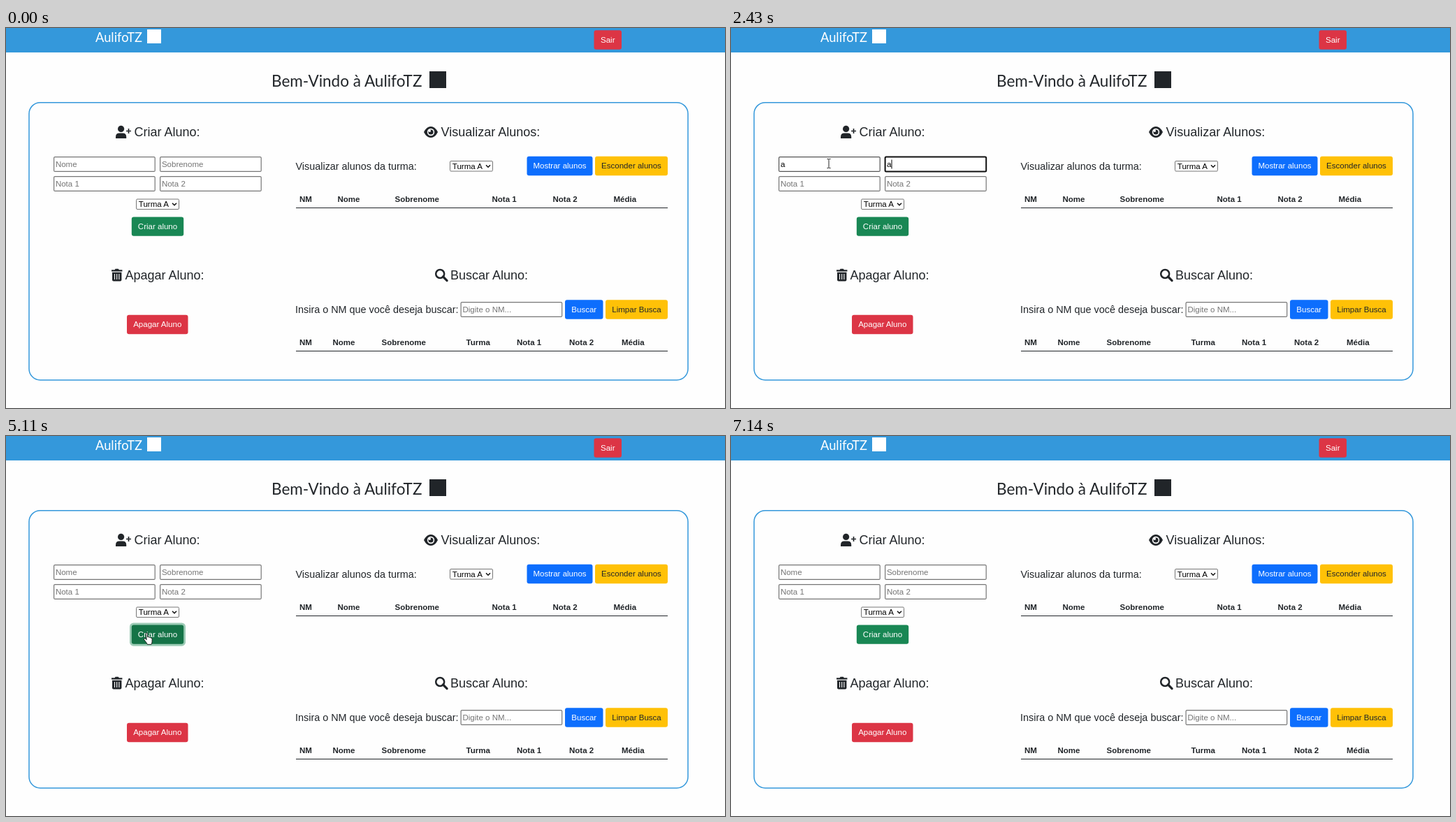
An HTML page that plays this animation: 1029x544 px, repeating every 7.21 s.

```html
<!DOCTYPE html>
<html lang="pt">
<head>
<meta charset="utf-8">
<title>AulifoTZ</title>
<style>
html, body { margin: 0; width: 100%; height: 100%; overflow: hidden; background: #fefefe; }
svg { display: block; width: 100%; height: 100%; }
text { font: 11.52px "Liberation Sans", Arial, sans-serif; fill: #212529; white-space: pre; }
.brand { font: 18.3px Lato, sans-serif; fill: #fff; }
.title { font: 22.5px Lato, sans-serif; }
.head { font-size: 18px; }
.label { font-size: 14.4px; }
.th { font-weight: bold; }
.mid { text-anchor: middle; }
.alert { font: 8.8px "Open Sans", sans-serif; fill: #fff; }
.ok { font: 8px "Open Sans", sans-serif; fill: #202124; }
.icon { fill: #212529; }
</style>
</head>
<body>
<svg id="stage" viewBox="0 0 1029 544">
  <defs>
    <filter id="shadow" x="-10%" y="-20%" width="120%" height="160%">
      <feDropShadow dx="0" dy="2" stdDeviation="2.5" flood-opacity=".4"/>
    </filter>
  </defs>
  <rect width="1029" height="35" fill="#3498db"/>
  <text class="brand" x="128" y="20">AulifoTZ</text>
  <rect x="202" y="2" width="20" height="20" fill="#fff"/>
  <text class="title" x="380" y="83.5">Bem-Vindo à AulifoTZ</text>
  <rect x="606" y="62" width="24" height="24" fill="#212529"/>
  <rect x="33" y="106.7" width="943" height="397.3" rx="16" fill="none" stroke="#3498db" stroke-width="1.5"/>

  <g class="icon">
    <circle cx="164.6" cy="144.4" r="4.6"/>
    <path d="M157 158v-2.200q0-5.300 5.300-5.300h4.600q5.300 0 5.300 5.300v2.200z"/>
    <path d="M175.500 144v7M172 147.500h7" stroke="#212529" stroke-width="1.700"/>
    <path d="M598 149Q602 141 608 141T618 149Q614 157 608 157T598 149z"/>
    <circle cx="608" cy="149" r="5.200" fill="#fefefe"/>
    <circle cx="608" cy="149" r="3.600"/>
    <circle cx="606.300" cy="147.300" r="1.700" fill="#fefefe"/>
    <path d="M151 346.300h4.600l1-1.500h4.200l1 1.500h4.600v2.300h-15.400zM152 349.800h13.400v10.800q0 2-2 2h-9.400q-2 0-2-2z"/>
    <path d="M155.500 352v8M158.700 352v8M161.900 352v8" stroke="#fefefe" stroke-width="1.100"/>
    <path d="M625.500 356l5.600 5.600" stroke="#212529" stroke-width="3.200" stroke-linecap="round"/>
    <circle cx="621.200" cy="352" r="6" fill="none" stroke="#212529" stroke-width="2.500"/>
  </g>
  <path d="M415 257.500H947M415 462.500H947" stroke="#212529"/>
  <g id="page"></g>

  <g id="dialog">
    <path d="M344 -10H665V64q0 3-3 3H347q-3 0-3-3z" fill="#292a2d" filter="url(#shadow)"/>
    <text class="alert" x="355.500" y="17">Aluno Criado com sucesso!</text>
    <rect x="607" y="32" width="46.500" height="23" rx="3" fill="none" stroke="#8ab4f8" stroke-width="1.400"/>
    <rect x="609" y="34" width="42.500" height="19" rx="1.500" fill="#8ab4f8"/>
    <text class="ok mid" x="630" y="46.500">OK</text>
  </g>

  <g id="cursor">
    <path id="arrow" d="M0 0V11.500L2.700 9.100L4.500 13.300L6.400 12.500L4.600 8.400H8.200z" fill="#fff" stroke="#111" stroke-width=".8"/>
    <path id="beam" d="M-2.500 -6.500H-.7L0 -5.800L.7 -6.500H2.500M0 -5.800V5.800M-2.500 6.500H-.7L0 5.800L.7 6.500H2.500" fill="none" stroke="#222"/>
    <path id="hand" d="M-1.300 1.200q0-1.300 1.200-1.300t1.200 1.300v4.600q2-.8 2.300.6q1.800-.7 2.200.7q2-.4 2 1.500v3.600q0 1.800-1.100 4.200h-5.700q-.6-2-2.400-3.900l-2.300-3q-.4-1.600 1-1.700q.9 0 2.600 1.900z" fill="#fff" stroke="#111" stroke-width=".9"/>
  </g>
</svg>
<script>
const LOOP = 7210, SEND = 5110, BLINK = 530, STEP = 70;
const $ = id => document.getElementById(id);
const page = $('page');

function add(tag, attrs, text = '') {
  const el = document.createElementNS('http://www.w3.org/2000/svg', tag);
  for (const k in attrs) el.setAttribute(k, attrs[k]);
  el.textContent = text;
  return page.appendChild(el);
}
const label = (cls, x, y, text) => add('text', { class: cls, x, y }, text);
const show = (el, on) => el.setAttribute('visibility', on ? 'visible' : 'hidden');

function button(x, y, w, fill, text, color = '#fff') {
  const box = add('rect', { x, y, width: w, height: 27.4, rx: 3, fill });
  add('text', { class: 'mid', x: x + w / 2, y: y + 17.6, style: 'fill:' + color }, text);
  return box;
}

function select(x, y) {
  add('rect', { x, y, width: 61, height: 14.5, rx: 1.5, fill: '#fff', stroke: '#767676' });
  label('', x + 3.3, y + 11.4, 'Turma A').style.fill = '#000';
  add('path', { d: `M${x + 51.5} ${y + 5.8}l3 3l3-3`, fill: 'none', stroke: '#111', 'stroke-width': 1.5 });
}

function input(x, y, hint, opts = {}) {
  const box = add('rect', { x: x + .6, y: y + .6, width: 144.6, height: 20.8, rx: 1.5, fill: '#fff' });
  const text = label('', x + 2.9, y + 14.5, hint);
  text.style.fill = '#757575';
  const caret = add('rect', { x, y: y + 4.5, width: 1, height: 13, fill: '#000' });
  const spin = add('g', {});
  if (opts.number) {
    const back = add('rect', { x: x + 132.5, y: y + 3.5, width: 10, height: 15, fill: '#efefef' });
    const tips = add('path', { d: `M${x + 134.7} ${y + 8.7}l2.600-3l2.600 3zM${x + 134.7} ${y + 13.700}l2.600 3l2.600-3z`, fill: '#444' });
    spin.append(back, tips);
  }
  return { x, y, hint, box, text, caret, spin, ...opts };
}

label('head', 183.5, 155, 'Criar Aluno:');
label('head', 622.5, 155, 'Visualizar Alunos:');
label('head', 170.5, 360, 'Apagar Aluno:');
label('head', 636, 360, 'Buscar Aluno:');
label('label', 414.5, 203, 'Visualizar alunos da turma:');
label('label', 414, 408, 'Insira o NM que você deseja buscar:');

function header(y, names, xs) {
  names.forEach((name, i) => label('th', xs[i], y, name));
}
header(248.5, ['NM', 'Nome', 'Sobrenome', 'Nota 1', 'Nota 2', 'Média'], [420, 474.5, 556.5, 695.5, 782.5, 869.5]);
header(453.8, ['NM', 'Nome', 'Sobrenome', 'Turma', 'Nota 1', 'Nota 2', 'Média'], [420, 467.5, 537.5, 658.5, 731, 806, 881]);

button(841.5, 3.3, 39.5, '#dc3545', 'Sair');
button(173, 410.8, 87.5, '#dc3545', 'Apagar Aluno');
button(745.5, 183.8, 94, '#0d6efd', 'Mostrar alunos');
button(843, 183.8, 104, '#ffc107', 'Esconder alunos', '#212529');
button(800, 389.3, 54.5, '#0d6efd', 'Buscar');
button(858, 389.3, 89, '#ffc107', 'Limpar Busca', '#212529');
const glow = add('rect', { x: 177, y: 267.5, width: 80, height: 33.2, rx: 5.5, fill: 'rgba(60,153,110,.5)' });
const create = button(179.8, 270.4, 74.4, '#198754', 'Criar aluno');
select(186.5, 245);
select(635.5, 190.5);

// focus, typing and blur times of each field
const fields = [
  input(68, 184, 'Nome', { value: 'a', focus: 1170, typed: 1770, blur: 1970 }),
  input(220, 184, 'Sobrenome', { value: 'a', focus: 1970, typed: 2430, blur: 2760 }),
  input(68, 212, 'Nota 1', { value: '6', focus: 2760, typed: 3490, blur: 3690, number: true }),
  input(220, 212, 'Nota 2', { value: '7', focus: 3690, typed: 3890, blur: 5040, number: true }),
];
const search = input(650.5, 392, 'Digite o NM...');
search.box.setAttribute('stroke', '#767676');
search.box.setAttribute('stroke-width', 1.2);
show(search.caret, false);

// pointer stops: time, x, y
const route = [
  [130, 810, 495], [830, 150, 215], [1240, 140, 194], [4350, 140, 194],
  [4420, 139, 193.5], [5040, 201.5, 284], [5110, 201.5, 282], [5170, 201.5, 282],
  [5510, 592, 40], [5710, 592, 40], [5920, 600, 30], [6130, 614, 49],
  [6400, 614, 49], [6610, 831, 494], [LOOP, 831, 494],
];

function pointer(t) {
  const i = Math.max(0, route.findLastIndex(p => p[0] <= t));
  const a = route[i], b = route[i + 1];
  const passed = Math.max(0, Math.floor((t - a[0]) / STEP) * STEP);
  const p = Math.min(1, passed / (b[0] - a[0]));
  const e = p * p * (3 - 2 * p);
  return [a[1] + (b[1] - a[1]) * e, a[2] + (b[2] - a[2]) * e];
}
const inside = (px, py, x, y, w, h) => px >= x && px <= x + w && py >= y && py <= y + h;

function drawField(f, t, hover) {
  const focused = t >= f.focus && t < f.blur;
  const filled = t >= f.typed && t < SEND;
  f.box.setAttribute('stroke', focused ? '#101010' : hover && filled ? '#555' : '#767676');
  f.box.setAttribute('stroke-width', focused ? 2 : 1.2);
  f.text.textContent = filled ? f.value : f.hint;
  f.text.style.fill = filled ? '#000' : '#757575';
  const since = t - (filled ? f.typed : f.focus);
  show(f.caret, focused && Math.floor(since / BLINK) % 2 === 0);
  f.caret.setAttribute('x', f.x + (filled ? 9.5 : 3));
  show(f.spin, focused || hover);
}

function draw(t) {
  const [x, y] = pointer(t);
  const visible = t >= 130 && t < 6680;
  const open = t >= 5240 && t < 6400;
  let beam = false;
  for (const f of fields) {
    const hover = visible && !open && inside(x, y, f.x, f.y, 146, 22);
    beam = beam || hover;
    drawField(f, t, hover);
  }
  const hand = visible && !open && inside(x, y, 180, 270, 74, 28);
  const pressed = t >= SEND && t < 7140;
  show(glow, pressed);
  create.setAttribute('fill', pressed || hand ? '#157347' : '#198754');
  show($('dialog'), open);
  $('cursor').setAttribute('transform', `translate(${x} ${y})`);
  show($('arrow'), visible && !beam && !hand);
  show($('beam'), visible && beam);
  show($('hand'), hand);
}

function tick() {
  draw(performance.now() % LOOP);
  requestAnimationFrame(tick);
}
tick();
</script>
</body>
</html>
```
